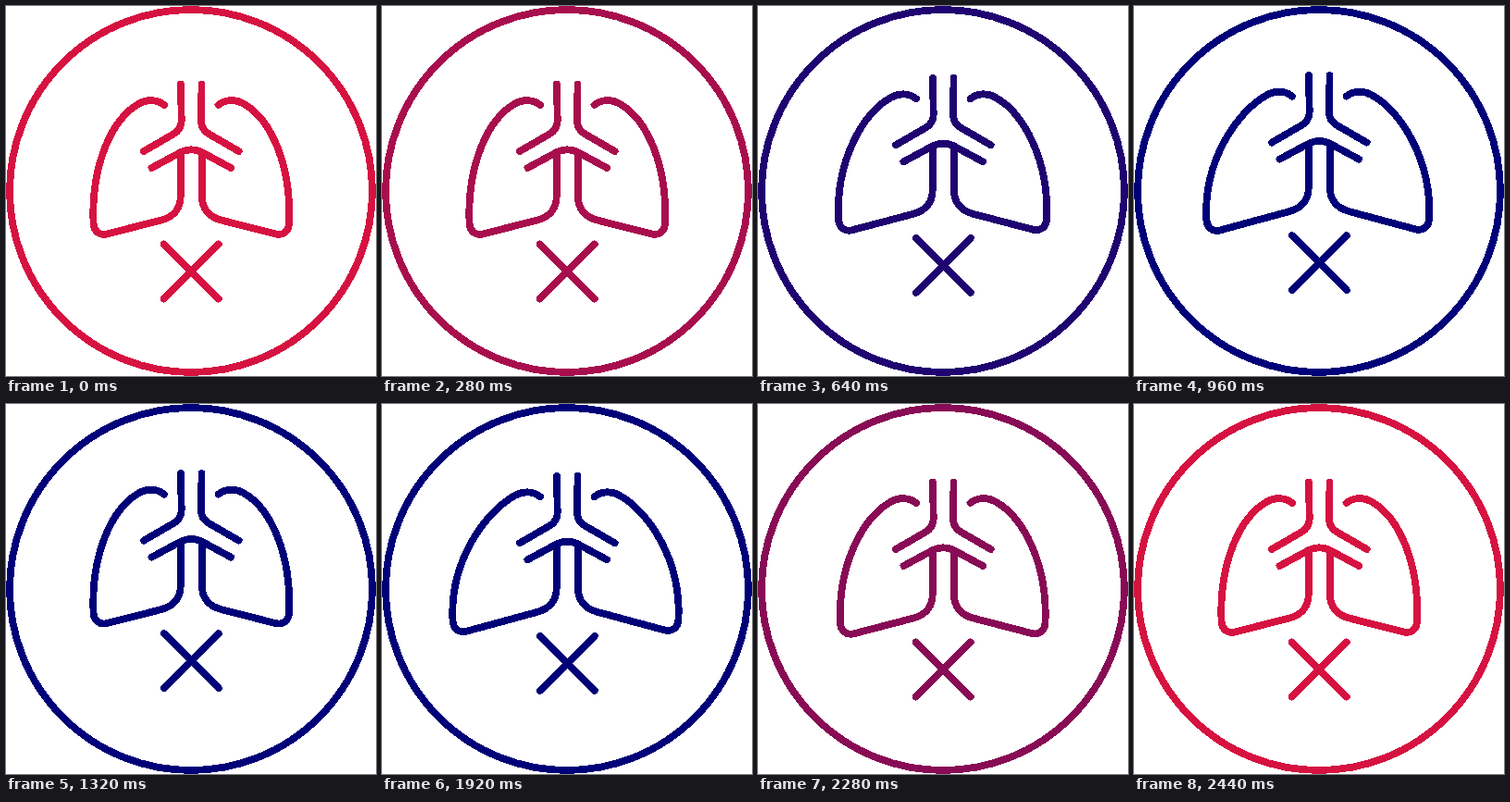
These frames come from a looping animation (400x400 px, 2640 ms). An HTML page:

```html
<!DOCTYPE html>
<html lang="en">
<head>
<meta charset="utf-8">
<title>Breathing lungs</title>
<style>
  html, body { margin: 0; width: 100%; height: 100%; overflow: hidden; background: #fff; }
  svg {
    display: block; width: 100%; height: 100%; fill: none; shape-rendering: crispEdges;
    stroke-width: 7.8; stroke-linecap: round; stroke-linejoin: round;
  }
</style>
</head>
<body>
<svg viewBox="0 0 400 400">
  <circle cx="200" cy="200" r="196"/>
  <g id="body">
    <g id="airway">
      <path d="M189 84.5 L189.7 124 Q189.7 133.5 181 138.5 L149 157"/>
      <path d="M157.5 175 L189 158 Q194.5 155.3 200.4 155.3"/>
    </g>
    <path id="left"/>
    <g transform="translate(400.6 0) scale(-1 1)">
      <use href="#airway"/>
      <path id="right"/>
    </g>
    <path d="M170.8 257.5 L229.8 316.5 M229.8 257.5 L170.8 316.5"/>
  </g>
</svg>
<script>
const LOOP = 2640, STEP = 40;
const RED = [214, 18, 65], NAVY = [0, 0, 120];
const RIGHT_SPREAD = 0.8; // the right lobe widens a little less
const svg = document.querySelector('svg');
const [body, left, right] = ['body', 'left', 'right'].map(id => document.getElementById(id));

// Linear track through [time, value] pairs, held at both ends
function track(t, keys) {
  if (t <= keys[0][0]) return keys[0][1];
  for (let i = 1; i < keys.length; i++) {
    const [t0, v0] = keys[i - 1], [t1, v1] = keys[i];
    if (t < t1) return v0 + (v1 - v0) * (t - t0) / (t1 - t0);
  }
  return keys[keys.length - 1][1];
}

// k: 0 = deflated, 1 = inflated
function lobePath(k) {
  const p = (x, y, dx = 0, dy = 0) => `${x - dx * k} ${y + dy * k} `;
  return 'M' + p(171, 107) +
    'C' + p(164, 101.3) + p(153, 100) + p(143, 106) +
    'C' + p(114, 123, 1) + p(92, 172, 19, 3) + p(94.5, 235, 18, 6) +
    'C' + p(95, 243.5, 18, 6) + p(101, 248.5, 18, 6) + p(109, 246.5, 18, 6) +
    'L' + p(168, 231.5) +
    'C' + p(181, 228) + p(188.7, 219) + p(188.7, 206) +
    'L' + p(188.7, 160);
}

function draw(now) {
  const t = Math.floor(now % LOOP / STEP) * STEP;
  const tint = track(t, [[160, 0], [720, 1], [2000, 1], [2440, 0]]);
  const lift = track(t, [[340, 0], [760, 9.4], [1800, 9.4], [2220, 0]]);
  const air = track(t, [[440, 0], [920, 1], [1320, 0], [1400, 0], [1920, 1], [2440, 0]]);
  const rgb = RED.map((c, i) => Math.round(c + (NAVY[i] - c) * tint));
  svg.setAttribute('stroke', `rgb(${rgb})`);
  body.setAttribute('transform', `translate(0 ${-lift})`);
  left.setAttribute('d', lobePath(air));
  right.setAttribute('d', lobePath(air * RIGHT_SPREAD));
}

const start = performance.now();
function loop() {
  draw(performance.now() - start);
  requestAnimationFrame(loop);
}
loop();
</script>
</body>
</html>
```
